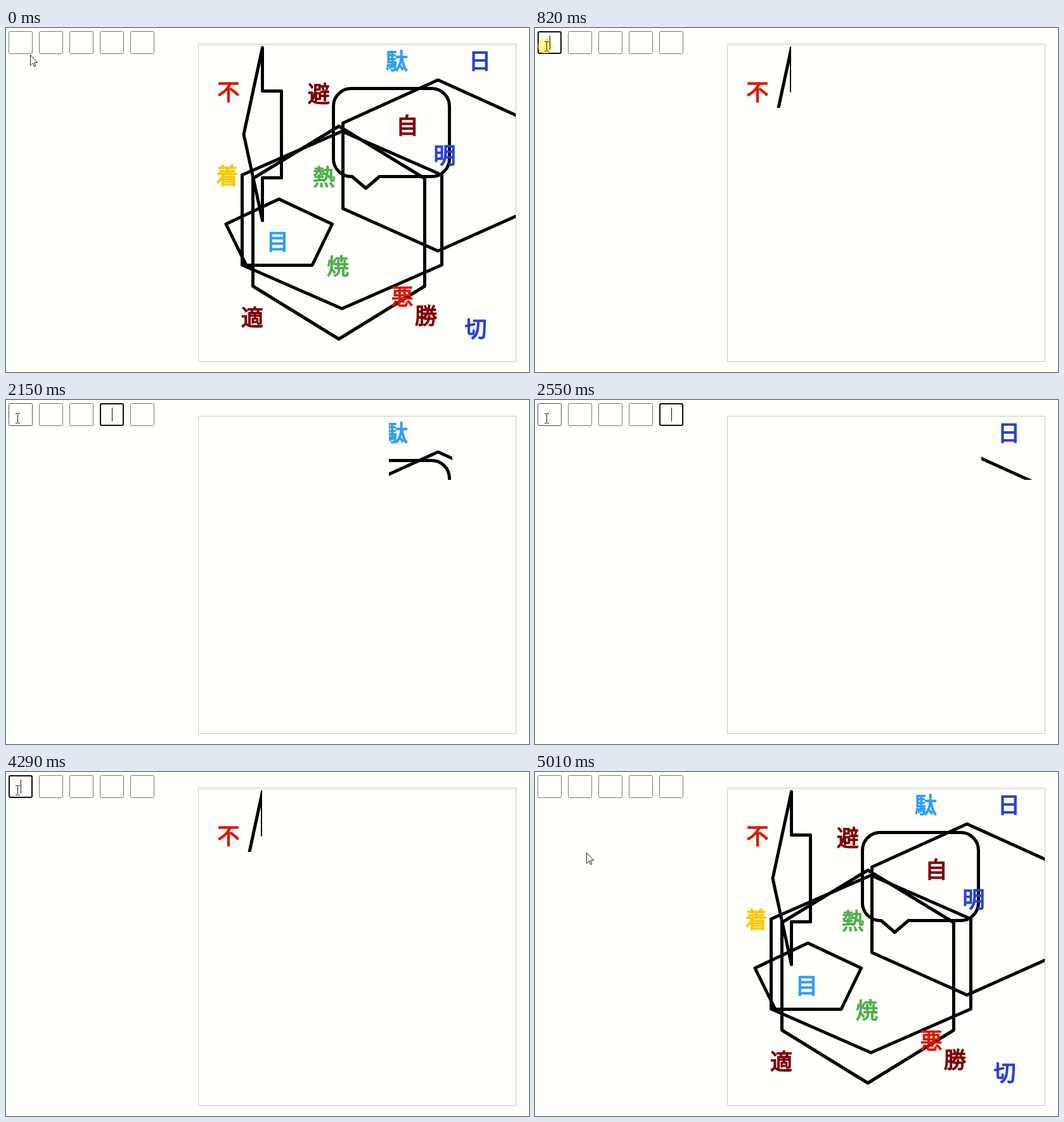
An HTML page with a canvas that plays this animation: 825x543 px, repeating every 5270 ms.

```html
<!DOCTYPE html>
<html lang="ja">
<head>
<meta charset="utf-8">
<title>Kanji tiles</title>
<style>
  html, body { margin: 0; width: 100%; height: 100%; overflow: hidden; background: #fffffc; }
  canvas { display: block; }
</style>
</head>
<body>
<canvas id="stage" width="825" height="543"></canvas>
<script>
const ctx = document.getElementById('stage').getContext('2d');
const LOOP = 5270;
const BOX_STEP = 48;
const TILE = 100;

// [start, focused box, time the caret blinks off]
const FOCUS = [
  [0, -1], [820, 0, 1350], [1620, 1], [1950, 2], [2150, 3], [2550, 4, 3030],
  [3300, 3], [3630, 2], [3960, 1], [4290, 0, 4810], [5010, -1]
];

const RED = '#de1800', YELLOW = '#fdc800', MAROON = '#7d0006';
const BLUE = '#2943d6', SKY = '#309ff0', GREEN = '#52b04c';
const KANJI = [
  ['不', 351, 101, RED], ['着', 349, 233, YELLOW], ['避', 493.5, 103.5, MAROON],
  ['駄', 616.5, 52, SKY], ['日', 747.5, 52, BLUE], ['自', 633, 154, MAROON],
  ['明', 692, 200.5, BLUE], ['熱', 501.5, 234.5, GREEN], ['目', 428.5, 337, SKY],
  ['焼', 523.5, 376, GREEN], ['悪', 625, 424, RED], ['勝', 662.5, 454, MAROON],
  ['適', 388.5, 457, MAROON], ['切', 741, 475, BLUE]
];

function polygon(...points) {
  const path = new Path2D();
  for (let i = 0; i < points.length; i += 2) path.lineTo(points[i], points[i + 1]);
  path.closePath();
  return path;
}

// Pointed hexagon: left, right, apex, shoulder, hip, foot
function hexagon(l, r, top, y1, y2, bottom) {
  const mid = (l + r) / 2;
  return polygon(mid, top, r, y1, r, y2, mid, bottom, l, y2, l, y1);
}

function speechBubble(l, t, r, b, radius) {
  const path = new Path2D();
  path.moveTo(l + radius, t);
  path.arcTo(r, t, r, b, radius);
  path.arcTo(r, b, l, b, radius);
  path.lineTo(589, b);
  path.lineTo(567.5, 253);
  path.lineTo(546, b);
  path.arcTo(l, b, l, t, radius);
  path.arcTo(l, t, r, t, radius);
  path.closePath();
  return path;
}

const SHAPES = [
  polygon(404.5, 31, 404.5, 99.5, 434.5, 99.5, 434.5, 236.5, 404.5, 236.5, 404.5, 304, 375, 168),
  hexagon(372.5, 687.5, 163, 232, 374, 443),
  hexagon(389.5, 660.5, 155, 237.5, 407.5, 491),
  hexagon(531.5, 831.5, 82, 150, 285, 352),
  polygon(430.5, 270, 514.5, 309.5, 483, 374.5, 379, 374.5, 347, 309.5),
  speechBubble(516.5, 95.5, 699.5, 234.5, 28)
];

const ARROW = polygon(0, 0, 0, 16.5, 3.8, 13, 6.2, 18.4, 8.4, 17.4, 6, 12.2, 11, 12);

function drawPuzzle(tile) {
  ctx.save();
  ctx.beginPath();
  if (tile < 0) ctx.rect(304, 26, 500, 500);
  else ctx.rect(304 + tile * TILE, 26, TILE, TILE);
  ctx.clip();
  ctx.lineJoin = 'round';
  ctx.lineWidth = 5;
  ctx.strokeStyle = '#000';
  SHAPES.forEach(shape => ctx.stroke(shape));
  ctx.font = '35px "Noto Sans CJK JP", "Noto Sans CJK", sans-serif';
  ctx.textAlign = 'center';
  ctx.lineWidth = 1.5;
  for (const [char, x, y, color] of KANJI) {
    ctx.fillStyle = ctx.strokeStyle = color;
    ctx.fillText(char, x, y + 13.3);
    ctx.strokeText(char, x, y + 13.3);
  }
  ctx.restore();
}

function drawInputs(focused, hovered) {
  for (let i = 0; i < 5; i++) {
    const active = i === focused;
    const inset = active ? 1 : 0.5;
    ctx.lineWidth = inset * 2;
    ctx.strokeStyle = active ? '#101010' : i === 0 && hovered ? '#4f4f4f' : '#767676';
    ctx.beginPath();
    ctx.roundRect(4 + i * BOX_STEP + inset, 5 + inset, 38 - 2 * inset, 36 - 2 * inset, 2);
    ctx.stroke();
  }
}

// Progress in n equal jumps, the first one at the start
const steps = (t, start, gap, n) =>
  Math.max(0, Math.min(n, Math.floor((t - start) / gap) + 1)) / n;

function pointerAt(t) {
  if (t < 4620) {
    const p = steps(t, 70, 70, 7);
    return [38 - 20 * p, 42 - 13 * p];
  }
  const p = steps(t, 4620, 63, 4);
  return [18 + 63 * p, 29 + 98 * p];
}

function drawPointer(x, y, overInput) {
  ctx.save();
  ctx.translate(Math.round(x), Math.round(y));
  if (overInput) {
    ctx.fillStyle = '#222';
    ctx.fillRect(0, -7, 1, 14);
    for (const edge of [-8, 7]) {
      ctx.fillRect(-3, edge, 3, 1);
      ctx.fillRect(1, edge, 3, 1);
    }
  } else {
    ctx.translate(0.5, 0.5);
    ctx.lineWidth = 1;
    ctx.fillStyle = '#fff';
    ctx.strokeStyle = '#222';
    ctx.fill(ARROW);
    ctx.stroke(ARROW);
  }
  ctx.restore();
}

function draw(t) {
  const [, focused, caretOff = Infinity] = FOCUS.findLast(([start]) => t >= start);
  const [x, y] = pointerAt(t);
  const overInput = x < 42 && y < 41;

  ctx.fillStyle = '#fffffc';
  ctx.fillRect(0, 0, 825, 543);
  ctx.lineWidth = 1;
  ctx.strokeStyle = '#c8c8c4';
  ctx.strokeRect(303.5, 25.5, 501, 501);
  drawPuzzle(focused);
  drawInputs(focused, overInput);

  if (t >= 820 && t < 890) {
    ctx.fillStyle = 'rgba(255, 250, 0, 0.5)';
    ctx.beginPath();
    ctx.arc(16.5, 28.5, 12, 0, 7);
    ctx.fill();
  }
  if (focused >= 0 && t < caretOff) {
    ctx.fillStyle = '#111';
    ctx.fillRect(23 + focused * BOX_STEP, 12, 1, 22);
  }
  drawPointer(x, y, overInput);
}

const begin = performance.now();
function tick() {
  draw((performance.now() - begin) % LOOP);
  requestAnimationFrame(tick);
}
tick();
</script>
</body>
</html>
```
